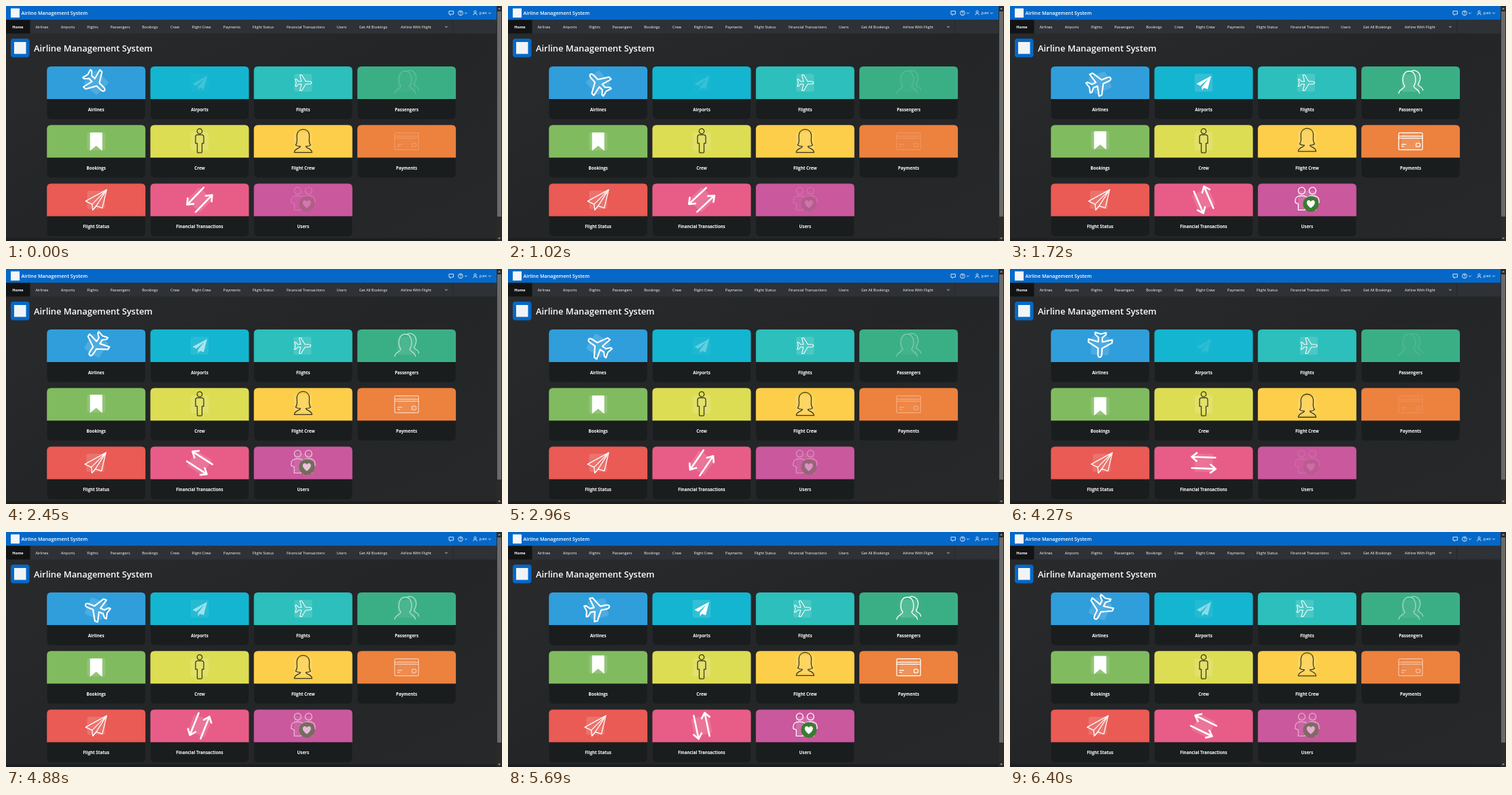
Animation, 730 px wide and 346 px high, one loop 6500 ms. Source, as an HTML page:

```html
<!DOCTYPE html>
<html lang="en">
<head>
<meta charset="utf-8">
<title>Airline Management System</title>
<style>
  html, body { margin: 0; width: 100%; height: 100%; overflow: hidden; background: #26282a; }
  svg { display: block; width: 100vw; height: 100vh; }
  text { font-family: "Open Sans", "Noto Sans", sans-serif; fill: #fff; }
  .strong { font-weight: 600; }
  .bold { font-weight: 700; }
  .mid { text-anchor: middle; }
  .line { fill: none; stroke: #fff; stroke-width: 1.3; stroke-linejoin: round; stroke-linecap: round; }
  .line * { vector-effect: non-scaling-stroke; }
  .dark { stroke: #3d3a22; stroke-width: 1.3; }
  .solid { fill: #fff; }
  .tile { fill: #fff; fill-opacity: .14; stroke: none; }
</style>
</head>
<body>
<svg viewBox="0 0 730 346" preserveAspectRatio="none">
  <defs>
    <linearGradient id="page" x2="1" y2="1">
      <stop stop-color="#2a2b2d"/><stop offset=".5" stop-color="#232527"/><stop offset="1" stop-color="#27282a"/>
    </linearGradient>
    <path id="plane" d="M13 0C13-1.8 10-2 9-2H4L-2-12H-5L-2.5-2H-7L-10-5.5H-12L-10.5 0L-12 5.5H-10L-7 2H-2.5L-5 12H-2L4 2H9C10 2 13 1.8 13 0Z"/>
    <path id="chevron" d="M-1.8-.9L0 .9L1.8-.9" fill="none" stroke="#fff" stroke-width=".8"/>
  </defs>

  <rect width="730" height="346" fill="url(#page)"/>
  <rect y="342" width="722" height="4" fill="#1d1e1f"/>

  <rect width="722" height="20.5" fill="#0568c8"/>
  <rect x="7" y="3.5" width="13" height="13.5" fill="#f4f6f8"/>
  <text class="strong" x="22.5" y="13.4" font-size="7.2">Airline Management System</text>
  <g fill="none" stroke="#fff" stroke-width=".8">
    <path d="M652 7.5H658.5V12H655.5L654 13.7V12H652Z"/>
    <circle cx="669" cy="10.3" r="3.4"/>
    <path d="M667.9 9.4Q668 8.3 669 8.3T670.1 9.4Q670 10.1 669 10.7V11.1M669 11.8V12.5"/>
    <circle cx="690.5" cy="8.6" r="1.6"/>
    <path d="M687.8 13.4Q687.8 10.8 690.5 10.8T693.2 13.4"/>
  </g>
  <use href="#chevron" x="677" y="10.5"/>
  <text x="696.6" y="12" font-size="4.4">guest</text>
  <use href="#chevron" x="712" y="10.5"/>

  <rect y="20.5" width="722" height="20" fill="#2e3135"/>
  <rect y="20.5" width="35.5" height="20" fill="#121314"/>
  <path d="M657.5 21V40.5" stroke="#25282b"/>
  <g id="tabs"></g>
  <use href="#chevron" x="648" y="30.7"/>

  <rect x="7" y="48" width="27.5" height="27.5" rx="4" fill="#0568c8"/>
  <rect x="12" y="53" width="17.5" height="17.5" fill="#f1f4f6"/>
  <text class="strong" x="41" y="67" font-size="12.88">Airline Management System</text>

  <g id="cards"></g>

  <rect x="722" width="8" height="346" fill="#2b2b2b"/>
  <rect x="723" y="8" width="6" height="302" fill="#6a6a6a"/>
  <path d="M724 5L726 2.5L728 5ZM724 341L726 343.5L728 341Z" fill="#9a9a9a"/>
</svg>
<script>
const LOOP = 6500, STEP = 101.6;

const tabs = [
  ["Home", 17.5], ["Airlines", 53], ["Airports", 91], ["Flights", 127.5], ["Passengers", 168],
  ["Bookings", 212], ["Crew", 248.5], ["Flight Crew", 287.5], ["Payments", 332.5],
  ["Flight Status", 378.5], ["Financial Transactions", 441], ["Users", 494],
  ["Get All Bookings", 540.5], ["Airline With Flight", 603.5]
];

const line = (body, extra = "") => `<g class="line ${extra}">${body}</g>`;
const solid = d => `<path class="solid" d="${d}"/>`;
const path = d => `<path d="${d}"/>`;

const icons = {
  jet: line('<use href="#plane" transform="translate(0 2) rotate(-90) scale(1.45)" stroke-width="1.5"/>'),
  plane: line('<use href="#plane" transform="scale(.96)" stroke-width="1.1"/>'),
  paper: solid("M11-10L-10.500 1.500L-5 4.500L7-6L-2.500 6V11L.5 7.500L6 9.500Z"),
  people: line(path("M-17.500 15.500C-17 9-9 9-8.500 5C-13-1-13-17-2-17C9-17 9-1 4.500 5C5 9 12 9 13 15.500") +
    path("M1-17C6-20 15-16 14-6C14-2 12 0 11 2C11 6 17.500 5 18 11"), "bright"),
  bookmark: solid("M-9-12Q-9-13-8-13H8Q9-13 9-12V14L0 6.500L-9 14Z"),
  person: line('<circle cy="-14.800" r="3.700"/>' +
    path("M-3-9.500H3Q6-9.500 6-6.500V3H3.500V15.500Q3.500 17 2 17H-2Q-3.500 17-3.500 15.500V3H-6V-6.500Q-6-9.500-3-9.500Z"), "dark"),
  woman: line(path("M-13 16.500C-13 10-5 11-4 7.500C-7 7.500-9 7-11 5.500C-7 0-10-4-9-10C-7-20 7-20 9-10C10-4 7 0 11 5.500C9 7 7 7.500 4 7.500C5 11 13 10 13 16.500Z"), "dark"),
  card: line('<rect x="-17.500" y="-12.500" width="35" height="25" rx="2"/><rect x="8" y="3" width="6" height="5" rx="1"/>' +
    path("M-17.500-7.500H17.500M-17.500-4.500H17.500M-13.500 4.500H-7M-13.500 7.500H-10")),
  glider: line(path("M15.500-15L-15.500 2L-6 6.500L-5 15L0 9L9 12Z") + path("M-6 6.500L15.500-15L0 9L-5 15")),
  arrows: `<g class="line" style="stroke-width:2.600">${
    [0, 180].map(a => `<path transform="rotate(${a})" d="M17-8.300H-18M-10.500-14.300L-18-8.300L-10.500-2.300"/>`).join("")}</g>`,
  couple: line([-8, 8].map(x => `<g transform="translate(${x})"><circle cy="-13.500" r="5"/>` +
      path("M-5 15V6L-9.500 4V1Q-9.500-6 0-6T9.500 1V4L5 6V15Z") + "</g>").join("")) +
    `<g transform="translate(5.500 6)"><circle r="11.500" fill="#397d31"/>${
      solid("M0 6C-8.500 0-6.500-5.500-3-5.500Q-.8-5.500 0-3.300Q.8-5.500 3-5.500C6.500-5.500 8.500 0 0 6Z")}</g>`
};

// Progress of a cubic-bezier(.42, 0, .58, 1) segment.
function easeInOut(x) {
  let lo = 0, hi = 1;
  for (let i = 0; i < 16; i++) {
    const u = (lo + hi) / 2, v = 1 - u;
    if (3 * v * v * u * .42 + 3 * v * u * u * .58 + u ** 3 < x) lo = u; else hi = u;
  }
  return lo * lo * (3 - 2 * lo);
}

// Two swings inside each second, then a rest.
function shake(s) {
  const p = s % 1 - .1425;
  return p > 0 && p < .62 ? Math.sin(2 * Math.PI * p / .31) : 0;
}

const motions = {
  spin: (el, s) => el.setAttribute("transform", `rotate(${134 + 180 * s})`),
  flash: (el, s) => el.setAttribute("opacity", easeInOut(Math.abs(1 - 2 * ((s + .35) % 1))).toFixed(3)),
  sideways: (el, s) => el.setAttribute("transform", `translate(${4.2 * shake(s)})`),
  upDown: (el, s) => el.setAttribute("transform", `translate(0 ${4.4 * shake(s)})`),
  still: () => {}
};

const cards = [
  ["Airlines", "#309edb", "jet", "spin"],
  ["Airports", "#13b5d0", "paper", "flash"],
  ["Flights", "#2cbfbb", "plane", "sideways"],
  ["Passengers", "#3aaf85", "people", "flash"],
  ["Bookings", "#81bb5f", "bookmark", "upDown"],
  ["Crew", "#dddd53", "person", "still"],
  ["Flight Crew", "#fcce4a", "woman", "upDown"],
  ["Payments", "#ed813e", "card", "flash"],
  ["Flight Status", "#e95b54", "glider", "sideways"],
  ["Financial Transactions", "#e85d88", "arrows", "spin"],
  ["Users", "#ca589d", "couple", "flash"]
];

document.getElementById("tabs").innerHTML = tabs.map(([name, x], i) =>
  `<text class="mid" x="${x}" y="32.8" font-size="5.5" font-weight="${i ? 400 : 700}">${name}</text>`).join("");

document.getElementById("cards").innerHTML = cards.map(([name, color, icon], i) => `
  <g transform="translate(${60.2 + i % 4 * 152.3} ${89 + Math.floor(i / 4) * 86.2})">
    <rect width="145" height="78" rx="6" fill="#1a1d1e" stroke="#2b2e30" stroke-width=".5"/>
    <path d="M0 48V6Q0 0 6 0H139Q145 0 145 6V48Z" fill="${color}"/>
    <g transform="translate(72.500 24)"><g class="icon">
      <rect class="tile" x="-13.300" y="-13.300" width="26.600" height="26.600" rx="3"/>${icons[icon]}
    </g></g>
    <text class="bold mid" x="72.500" y="65.800" font-size="6.250">${name}</text>
  </g>`).join("");

const iconEls = [...document.querySelectorAll(".icon")];

function draw(now) {
  const t = now % LOOP;
  const seconds = Math.floor((t + 5) / STEP) * STEP / 1000;
  iconEls.forEach((el, i) => motions[cards[i][3]](el, seconds));
  requestAnimationFrame(() => draw(performance.now() - start));
}
const start = performance.now();
draw(0);
</script>
</body>
</html>
```
